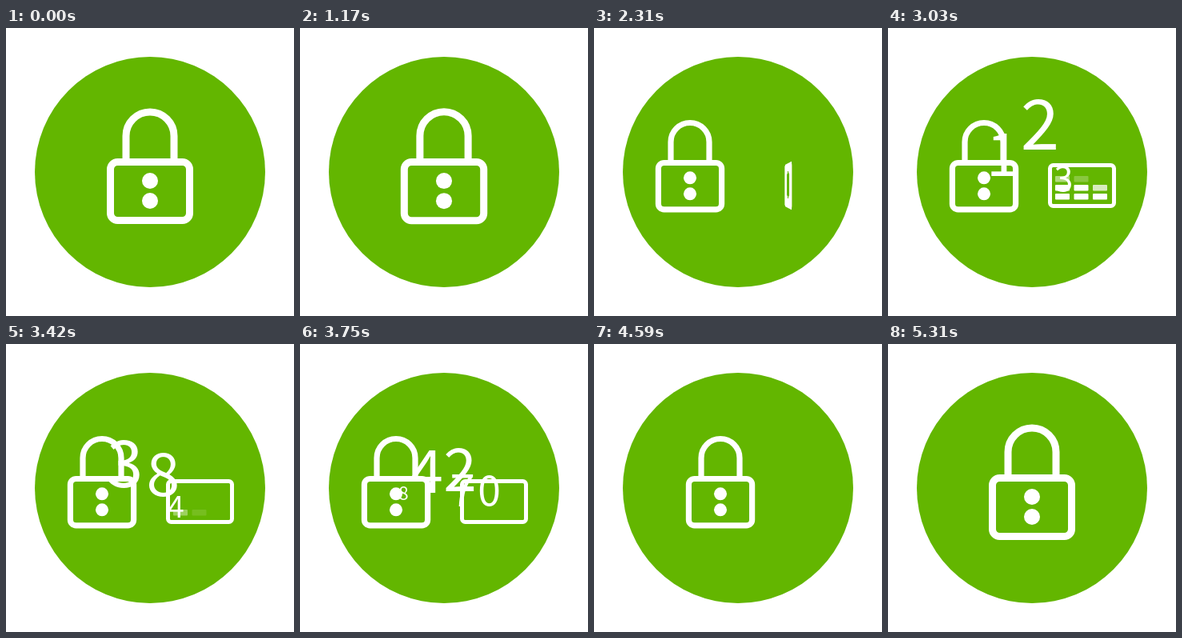
Recreate the animation shown at these times as an HTML page. Size 360 px wide and 360 px high, loop 5.4 s.

```html
<!DOCTYPE html>
<html lang="en">
<head>
<meta charset="utf-8">
<title>Card to lock</title>
<style>
  html, body { margin: 0; width: 100%; height: 100%; overflow: hidden; background: #fff; }
  #stage { position: relative; width: 360px; height: 360px; clip-path: circle(144px at 180px 180px); background: #63b600; }
  svg { position: absolute; left: 0; top: 0; overflow: visible; }
  #card { position: absolute; left: 200px; top: 169px; width: 85px; height: 56px; }
  #card svg { width: 85px; height: 56px; }
  #back { transform: scaleX(-1); }
  text {
    font-family: "Noto Sans CJK SC", "Noto Sans CJK JP", "DejaVu Sans", sans-serif;
    font-weight: 350; text-anchor: middle; fill: #fff;
  }
</style>
</head>
<body>
<div id="stage">
  <svg width="360" height="360">
    <g id="lock" fill="none" stroke="#fff" stroke-width="9">
      <path d="M150 167V135a30 30 0 0 1 60 0V167"/>
      <rect x="130.5" y="167.5" width="99" height="73" rx="9"/>
      <g fill="#fff" stroke="none">
        <circle cx="180" cy="191" r="10"/>
        <circle cx="180" cy="216" r="10"/>
      </g>
    </g>
  </svg>
  <div id="card">
    <svg id="front">
      <rect width="85" height="56" rx="5" fill="#fff"/>
      <circle cx="42.5" cy="27" r="17" fill="#63b600"/>
    </svg>
    <svg id="back">
      <rect x="2.5" y="2.5" width="80" height="51" rx="4" fill="none" stroke="#fff" stroke-width="5"/>
      <g id="bars" fill="#fff"></g>
    </svg>
  </div>
  <svg id="digits" width="360" height="360"></svg>
</div>
<script>
const LOOP = 5400, FLIGHT = 500;
const TARGET = [126, 191];
const HIGH = [197, 39], LOW = [184, 110];

// glyph, launch time, start x, start y, arc control, full height
const FLIGHTS = [
  ["1", 2595, 222, 205, HIGH, 64],
  ["2", 2805, 222, 205, HIGH, 64],
  ["3", 3005, 222, 205, HIGH, 64],
  ["8", 3265, 222, 205, LOW, 55],
  ["4", 3400, 215, 212, LOW, 55],
  ["2", 3600, 228, 191, LOW, 55],
  ["7", 3690, 210, 202, LOW, 55],
  ["0", 3700, 250, 200, LOW, 55]
];

const $ = id => document.getElementById(id);
const lock = $("lock"), card = $("card"), front = $("front"), back = $("back");

function add(parent, tag, attrs) {
  const el = document.createElementNS("http://www.w3.org/2000/svg", tag);
  for (const key in attrs) el.setAttribute(key, attrs[key]);
  return parent.appendChild(el);
}

const clamp = v => Math.max(0, Math.min(1, v));
const part = (t, start, length) => clamp((t - start) / length);
const ease = p => (1 - Math.cos(Math.PI * p)) / 2;
const windUp = p => p * p * (3.2 * p - 2.2);
const bezier = (a, b, c, u) => (1 - u) ** 2 * a + 2 * u * (1 - u) * b + u * u * c;

// Bars fade right to left, row by row
const bars = Array.from({ length: 9 }, (_, i) => add($("bars"), "rect", {
  x: 56 - 23.5 * (i % 3),
  y: 16 + 11 * Math.floor(i / 3),
  width: 18, height: 7.5, rx: 1
}));

const digits = FLIGHTS.map(([glyph]) => {
  const el = add($("digits"), "text", {});
  el.textContent = glyph;
  return el;
});

function drawLock(t) {
  const away = ease(part(t, 1425, 360)) - ease(part(t, 4380, 360));
  const small = windUp(part(t, 1140, 300)) - ease(part(t, 5100, 210));
  lock.setAttribute("transform",
    `translate(${180 - 60 * away} 172.5) scale(${1 - 0.2 * small}) translate(-180 -172.5)`);
}

function drawCard(t) {
  const shift = 150 * (1 - ease(part(t, 1480, 420)) + ease(part(t, 4000, 420)));
  const angle = 180 * ease(part(t, 2110, 420));
  card.style.transform = `translateX(${shift}px) perspective(510px) rotateY(${-angle}deg)`;
  front.style.visibility = angle < 90 ? "visible" : "hidden";
  back.style.visibility = angle < 90 ? "hidden" : "visible";
  bars.forEach((bar, i) => bar.setAttribute("opacity", 1 - part(t, 2790 + 60 * i, 240)));
}

function drawDigit(el, [, start, x, y, arc, full], t) {
  const u = (t - start) / FLIGHT;
  const flying = u > 0 && u < 1;
  el.style.display = flying ? "" : "none";
  if (!flying) return;
  const grow = 20 + (full - 20) * clamp(u / 0.2);
  const height = grow * (1 - clamp((u - 0.6) / 0.4) ** 5);
  el.setAttribute("x", bezier(x, arc[0], TARGET[0], u));
  el.setAttribute("y", bezier(y, arc[1], TARGET[1], u) + height / 2);
  el.style.fontSize = height / 0.733 + "px";
}

function draw(now) {
  const t = now % LOOP;
  drawLock(t);
  drawCard(t);
  digits.forEach((el, i) => drawDigit(el, FLIGHTS[i], t));
}

const began = performance.now();
function tick() {
  draw(performance.now() - began);
  requestAnimationFrame(tick);
}
tick();
</script>
</body>
</html>
```
